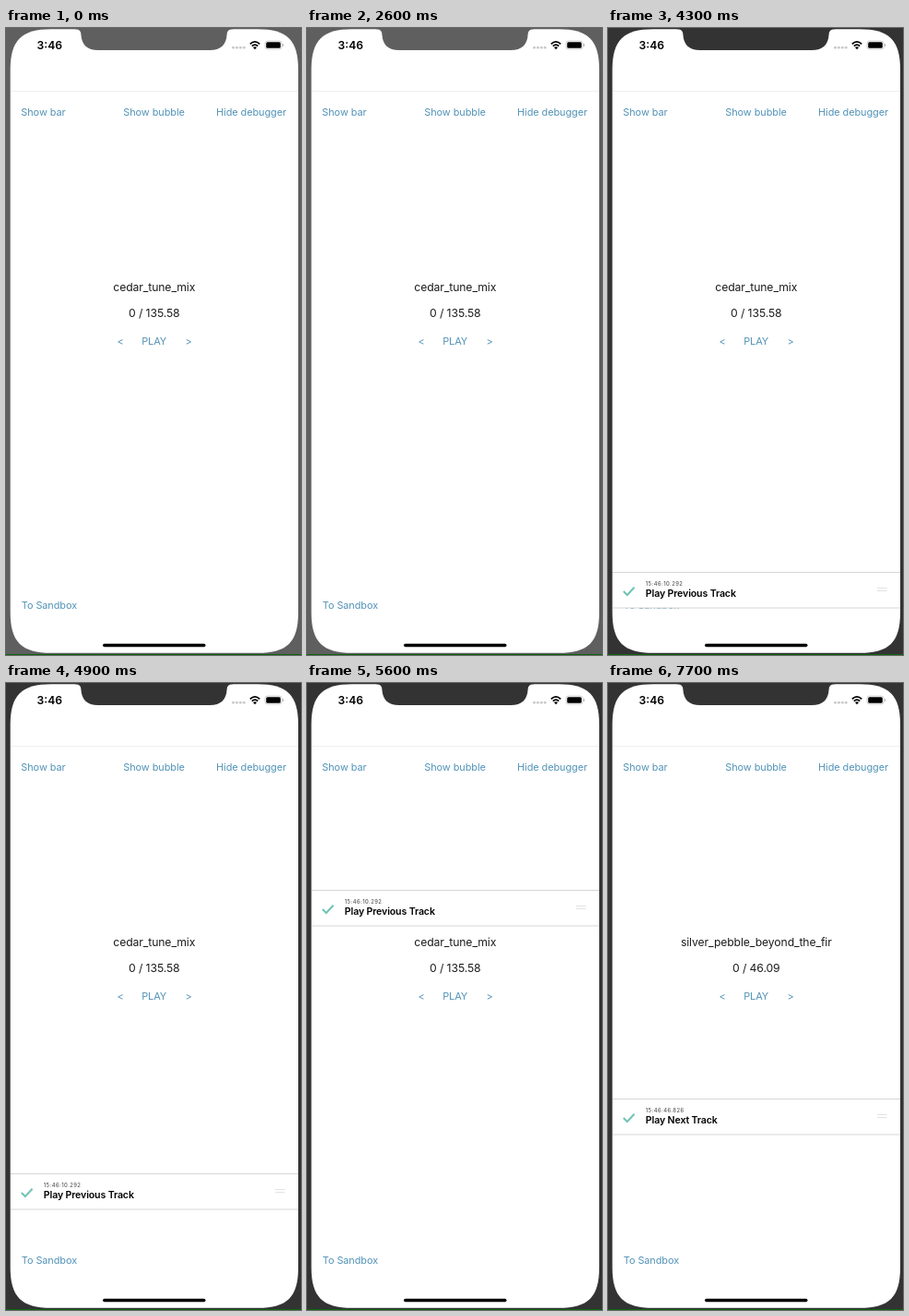
Animation, 320 px wide and 679 px high, one loop 8000 ms. Source, as an HTML page:

```html
<!DOCTYPE html>
<html lang="en">
<head>
<meta charset="utf-8">
<title>Debugger bar</title>
<style>
  html, body { margin: 0; width: 100%; height: 100%; overflow: hidden; background: #333; }
  svg { display: block; width: 100vw; height: 100vh; font-family: Inter, Roboto, sans-serif; }
  .link { font-size: 10.9px; letter-spacing: -.06px; fill: #5293b7; }
  .info { font-size: 12.2px; letter-spacing: -.1px; fill: #1c1c1c; }
  .clock { font-size: 12.2px; font-weight: 600; }
  .stamp { font-size: 5.8px; font-weight: 500; letter-spacing: .42px; fill: #555; }
  .event { font-size: 10.6px; font-weight: 600; letter-spacing: -.13px; }
  .mid { text-anchor: middle; }
  .end { text-anchor: end; }
</style>
</head>
<body>
<svg viewBox="0 0 320 679">
  <rect id="back" width="320" height="679"/>
  <rect y="678" width="320" height="1" fill="#0c640c"/>
  <path fill="#fff" d="M4.7 45C4.7 13 17 1.2 49 1.2H273C305 1.2 317 13 317 45V633C317 665 305 676.8 273 676.8H49C17 676.8 4.7 665 4.7 633Z"/>
  <path id="notch" d="M75 0V1.2Q81.4 1.2 81.4 7C82 18 88 24 100 24H221C233 24 239 18 239.6 7Q239.6 1.2 246 1.2V0Z"/>

  <text class="clock mid" x="47.4" y="22.8">3:46</text>
  <g fill="#c9c9c9">
    <rect x="245" y="20" width="3" height="2.6" rx="1"/>
    <rect x="248.9" y="20" width="3" height="2.6" rx="1"/>
    <rect x="252.8" y="20" width="3" height="2.6" rx="1"/>
    <rect x="256.7" y="20" width="3" height="2.6" rx="1"/>
  </g>
  <g fill="none" stroke="#000" stroke-width="1.8">
    <path d="M264.8 17.4Q270 12.4 275.2 17.4"/>
    <path d="M266.8 19.6Q270 16.6 273.2 19.6"/>
  </g>
  <path d="M268 21Q270 19.4 272 21L270 23.2Z"/>
  <rect x="281" y="14" width="18" height="9" rx="2.6" fill="none" stroke="#c2c2c2" stroke-width=".8"/>
  <rect x="282.2" y="15.2" width="15.6" height="6.6" rx="1.5"/>
  <rect x="299.8" y="17" width="1.2" height="3" rx=".6" fill="#b5b5b5"/>

  <path d="M5 68.5H317" stroke="#efefef"/>
  <text class="link" id="show" x="16.3" y="95">Show bar</text>
  <text class="link mid" x="160.5" y="95">Show bubble</text>
  <text class="link end" x="304" y="95">Hide debugger</text>

  <text class="info mid" id="track" x="160.8" y="285.2"></text>
  <text class="info mid" id="time" x="160.8" y="312.8"></text>
  <text class="link mid" x="124" y="343">&lt;</text>
  <text class="link mid" x="160.7" y="343">PLAY</text>
  <text class="link mid" id="next" x="198" y="343">&gt;</text>
  <text class="link" x="16.8" y="628.6">To Sandbox</text>

  <g id="bar">
    <rect x="5" width="312" height="38.5" fill="#fff"/>
    <path d="M5 0H317M5 38.5H317" stroke="#d6d6d6"/>
    <path d="M16.8 20.6L20.8 24.4L28.6 16.2" fill="none" stroke="#72c4b4" stroke-width="2.1"/>
    <path d="M292 17H302.5M292 20H302.5" stroke="#e2e2e2"/>
    <text class="stamp" id="stamp" x="40.8" y="14.8"></text>
    <text class="event" id="event" x="40.8" y="26.2"></text>
  </g>

  <rect x="105" y="666.8" width="111.5" height="3.5" rx="1.75"/>
</svg>
<script>
const LOOP = 8000, STEP = 100;
const SHOW_TAP = 2900, BAR_IN = 3000, NEXT_TAP = 7200, SWITCH = 7300;

// time and top edge of the bar, eased between points
const PATH = [[3000, 619], [3400, 589], [4704, 589], [5500, 183], [5913, 484], [6100, 450]];

const PREVIOUS = {
  track: "cedar_tune_mix", time: "0 / 135.58",
  stamp: "15:46:10.292", event: "Play Previous Track"
};
const NEXT = {
  track: "silver_pebble_beyond_the_fir", time: "0 / 46.09",
  stamp: "15:46:46.826", event: "Play Next Track"
};

const $ = id => document.getElementById(id);
const clamp = u => Math.min(1, Math.max(0, u));
const ease = u => (1 - Math.cos(Math.PI * u)) / 2;

function barTop(t) {
  const last = PATH.length - 1;
  if (t <= PATH[0][0]) return PATH[0][1];
  for (let i = 0; i < last; i++) {
    const [t0, y0] = PATH[i], [t1, y1] = PATH[i + 1];
    if (t < t1) return y0 + (y1 - y0) * ease((t - t0) / (t1 - t0));
  }
  return PATH[last][1];
}

// a pressed link dims, then fades back
function pressed(t, start, hold) {
  return t < start ? 1 : 0.3 + 0.7 * clamp((t - start - hold) / 300);
}

function draw(t) {
  const color = t < SHOW_TAP ? "#5f5f5f" : "#333";
  $("back").setAttribute("fill", color);
  $("notch").setAttribute("fill", color);
  $("show").setAttribute("opacity", pressed(t, SHOW_TAP, 200));
  $("next").setAttribute("opacity", pressed(t, NEXT_TAP, 0));

  const y = Math.floor(barTop(t)) + 0.5;
  $("bar").setAttribute("transform", `translate(0 ${y})`);
  $("bar").setAttribute("opacity", clamp((t - BAR_IN) / 300));

  const labels = t < SWITCH ? PREVIOUS : NEXT;
  for (const id in labels) $(id).textContent = labels[id];
}

function tick(now) {
  draw(Math.floor((now % LOOP) / STEP) * STEP);
  requestAnimationFrame(tick);
}
draw(0);
requestAnimationFrame(tick);
</script>
</body>
</html>
```
